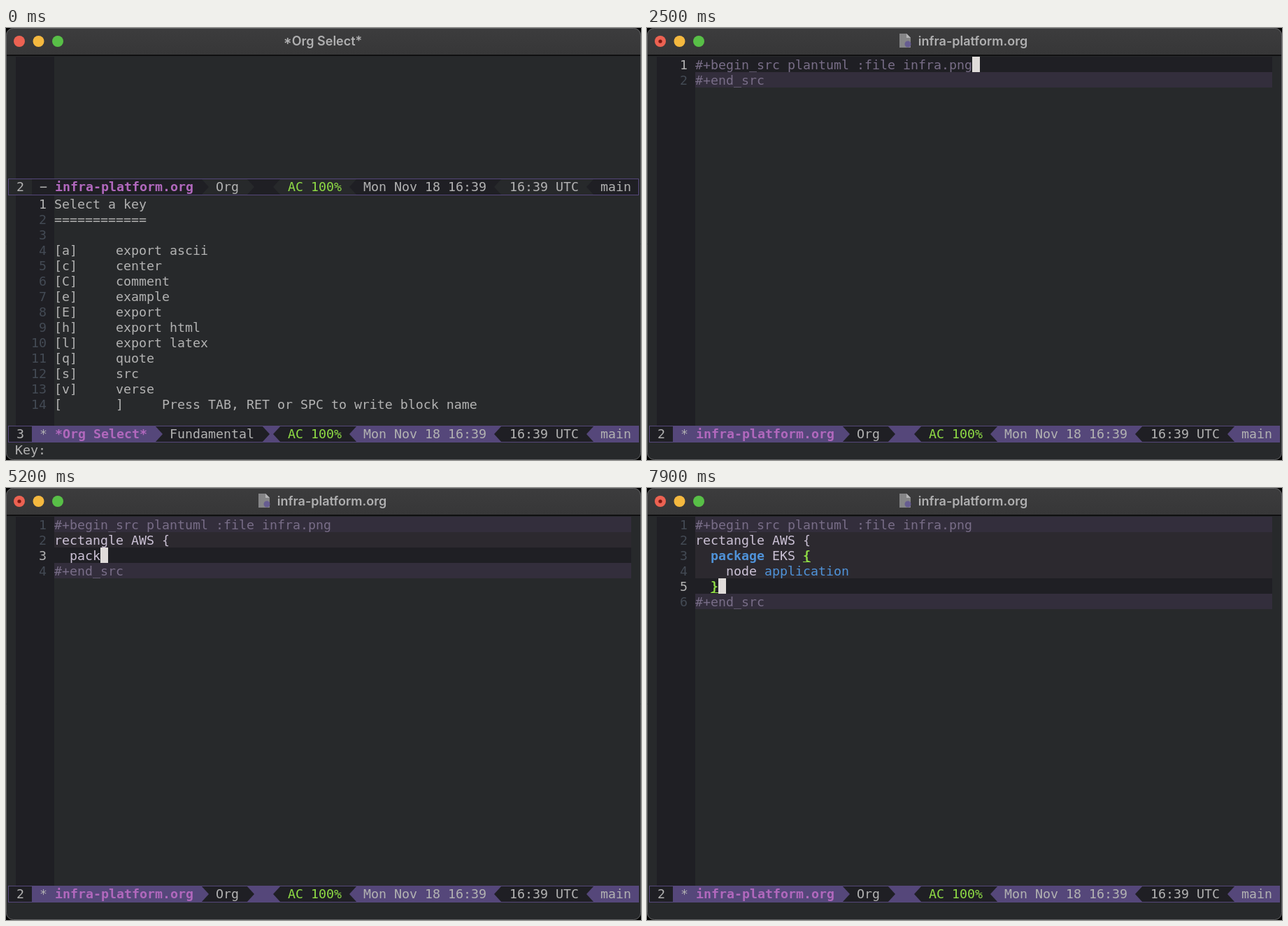
These frames come from a looping animation (908 by 617 pixels, 8000 ms). An HTML page with a canvas:

```html
<!DOCTYPE html>
<html lang="en">
<head>
<meta charset="utf-8">
<title>Editor session</title>
<style>
html, body { margin: 0; width: 100%; height: 100%; overflow: hidden; background: #000; }
canvas { display: block; }
</style>
</head>
<body>
<canvas id="stage" width="908" height="617"></canvas>
<script>
const ctx = document.getElementById('stage').getContext('2d');
const LOOP = 8000, STEP = 100;
const CELL = 11, ROW = 22, LEFT = 69, TOP = 41, RIGHT = 894;
const MONO = '18.27px "DejaVu Sans Mono", monospace';
const C = {
  bg: '#27292b', dark: '#1f1f24', fence: '#332e3c', code: '#2c292f', purple: '#55477a',
  text: '#b2b2b2', number: '#434a54', fenceText: '#786d87', codeText: '#cbc1d5',
  blue: '#4f92d8', green: '#8fdc45', magenta: '#b168bd', cursor: '#e0dcda'
};
const MENU = [
  'Select a key', '============', '',
  '[a]     export ascii', '[c]     center', '[C]     comment', '[e]     example',
  '[E]     export', '[h]     export html', '[l]     export latex', '[q]     quote',
  '[s]     src', '[v]     verse', '[       ]     Press TAB, RET or SPC to write block name'
];
// One step per character; (..) groups keys, _ waits, < deletes.
const KEYS = '_(pl)(an)t(um)l :file ____infra.p(ng)\n(re)ctangle AWS {\n(oa)ck<<<<' +
  'package EKS {\nno(de) application\n}';
const steps = KEYS.match(/\(.*?\)|[^]/g).map(s => s.replace(/[()_]/g, ''));

function rect(x, y, w, h, color) {
  ctx.fillStyle = color;
  ctx.fillRect(x, y, w, h);
}

function poly(points, color) {
  ctx.fillStyle = color;
  ctx.beginPath();
  points.forEach(([x, y]) => ctx.lineTo(x, y));
  ctx.fill();
}

function dot(x, y, r, color) {
  ctx.fillStyle = color;
  ctx.beginPath();
  ctx.arc(x, y, r, 0, 2 * Math.PI);
  ctx.fill();
}

function text(s, x, y, color, bold) {
  ctx.font = (bold ? 'bold ' : '') + MONO;
  ctx.fillStyle = color;
  ctx.fillText(s, x, y);
}

function lineNumber(n, y, current) {
  text(String(n), 58 - CELL * String(n).length, y, current ? C.text : C.number);
}

function typed(step) {
  const lines = ['#+begin_src '];
  for (const key of steps.slice(0, step).join('')) {
    const last = lines.length - 1;
    if (key === '\n') {
      const depth = lines.join('').split('{').length - 1;
      lines.push('  '.repeat(depth));
    } else if (key === '<') lines[last] = lines[last].slice(0, -1);
    else if (key === '}') lines[last] = lines[last].slice(0, -2) + key;
    else lines[last] += key;
  }
  return lines;
}

function titleBar(title, modified) {
  const shade = ctx.createLinearGradient(0, 0, 0, 38);
  shade.addColorStop(0, '#3c3c3d');
  shade.addColorStop(1, '#373738');
  rect(0, 0, 908, 38, shade);
  rect(0, 38, 908, 2, '#101011');
  ['#ec6252', '#f4b83f', '#58bf47'].forEach((color, i) => dot(19 + 27.5 * i, 19, 8, color));
  if (modified) {
    dot(19, 19, 2.6, '#7d1710');
    poly([[361, 8], [371, 8], [377, 14], [377, 28], [361, 28]], '#858587');
    poly([[371, 8], [377, 14], [371, 14]], '#b5b5b7');
    dot(373, 23, 4.5, '#665c91');
  }
  ctx.font = '600 18px Inter, sans-serif';
  ctx.fillStyle = '#b0b0b1';
  ctx.textAlign = 'center';
  ctx.fillText(title, modified ? 466 : 453, 25);
  ctx.textAlign = 'left';
}

function modeLine(y, number, flag, name, mode, active) {
  const main = active ? C.purple : C.dark, alt = active ? C.dark : C.bg;
  const h = 24, mid = y + h / 2, base = y + 18;
  const nameEnd = LEFT + CELL * name.length + 12;
  const modeX = nameEnd + 21, modeEnd = modeX + CELL * mode.length + 11;
  const right = (x, color) => poly([[x, y], [x + 11, mid], [x, y + h]], color);
  const left = (x, color) => poly([[x + 11, y], [x, mid], [x + 11, y + h]], color);

  rect(3, y, 902, h, main);
  rect(4, y, 33, h, alt);
  rect(nameEnd, y, modeEnd - nameEnd, h, alt);
  right(nameEnd, main);
  right(modeEnd, alt);
  for (const [from, to] of [[382, 491], [698, 830]]) {
    left(from, alt);
    rect(from + 11, y, to - from, h, alt);
    left(to, main);
  }
  ctx.strokeStyle = C.purple;
  ctx.lineWidth = 1;
  ctx.strokeRect(3.5, y + .5, 901, h - 1);

  text(number, 15, base, C.text);
  text(flag, 48, base, C.text);
  text(name, LEFT + 1, base, C.magenta, true);
  text(mode, modeX, base, C.text);
  text('AC 100%', 403, base, C.green);
  text('Mon Nov 18 16:39', 511, base, C.text);
  text('16:39 UTC', 720, base, C.text);
  text('main', 850, base, C.text);
}

function menu() {
  titleBar('*Org Select*', false);
  rect(14, TOP, LEFT - 14, 527, C.dark);
  modeLine(215, '2', '−', 'infra-platform.org', 'Org', false);
  MENU.forEach((line, i) => {
    const y = 258 + ROW * i;
    lineNumber(i + 1, y, i === 0);
    text(line, LEFT, y, C.text);
  });
  modeLine(568, '3', '*', '*Org Select*', 'Fundamental', true);
  text('Key:', 13, 609, C.text);
}

function codeLine(line, y, matched) {
  let x = LEFT;
  for (const part of line.split(/(\bpackage\b|\bapplication\b|[{}])/)) {
    const lit = matched && /[{}]/.test(part), pack = part === 'package';
    const color = lit ? C.green : pack || part === 'application' ? C.blue : C.codeText;
    text(part, x, y, color, lit || pack);
    if (lit) rect(x, y + 2, CELL, 1, C.green);
    x += CELL * part.length;
  }
}

function editor(step) {
  const lines = typed(step), current = lines.length - 1;
  const closed = lines[current].endsWith('}');
  titleBar('infra-platform.org', true);
  rect(14, TOP, LEFT - 14, 527, C.dark);
  [...lines, '#+end_src'].forEach((line, i) => {
    const top = TOP + ROW * i, y = top + 18;
    const fence = i === 0 || i > current;
    if (i === current) rect(14, top, RIGHT - 14, ROW, C.dark);
    else rect(LEFT, top, RIGHT - LEFT, ROW, fence ? C.fence : C.code);
    lineNumber(i + 1, y, i === current);
    if (fence) text(line, LEFT, y, C.fenceText);
    else codeLine(line, y, closed && (i === 2 || i === current));
    if (i === current) rect(LEFT + CELL * line.length, top, CELL, ROW, C.cursor);
  });
  modeLine(568, '2', '*', 'infra-platform.org', 'Org', true);
}

function draw() {
  const step = Math.floor(performance.now() % LOOP / STEP);
  rect(0, 0, 908, 617, '#000');
  ctx.save();
  ctx.beginPath();
  ctx.roundRect(0, 0, 908, 617, 10);
  ctx.clip();
  rect(0, 0, 908, 617, C.bg);
  if (step === 0) menu();
  else editor(step);
  ctx.restore();
  ctx.strokeStyle = '#606162';
  ctx.lineWidth = 1;
  ctx.beginPath();
  ctx.roundRect(.5, .5, 907, 616, 10);
  ctx.stroke();
  requestAnimationFrame(draw);
}
draw();
</script>
</body>
</html>
```
